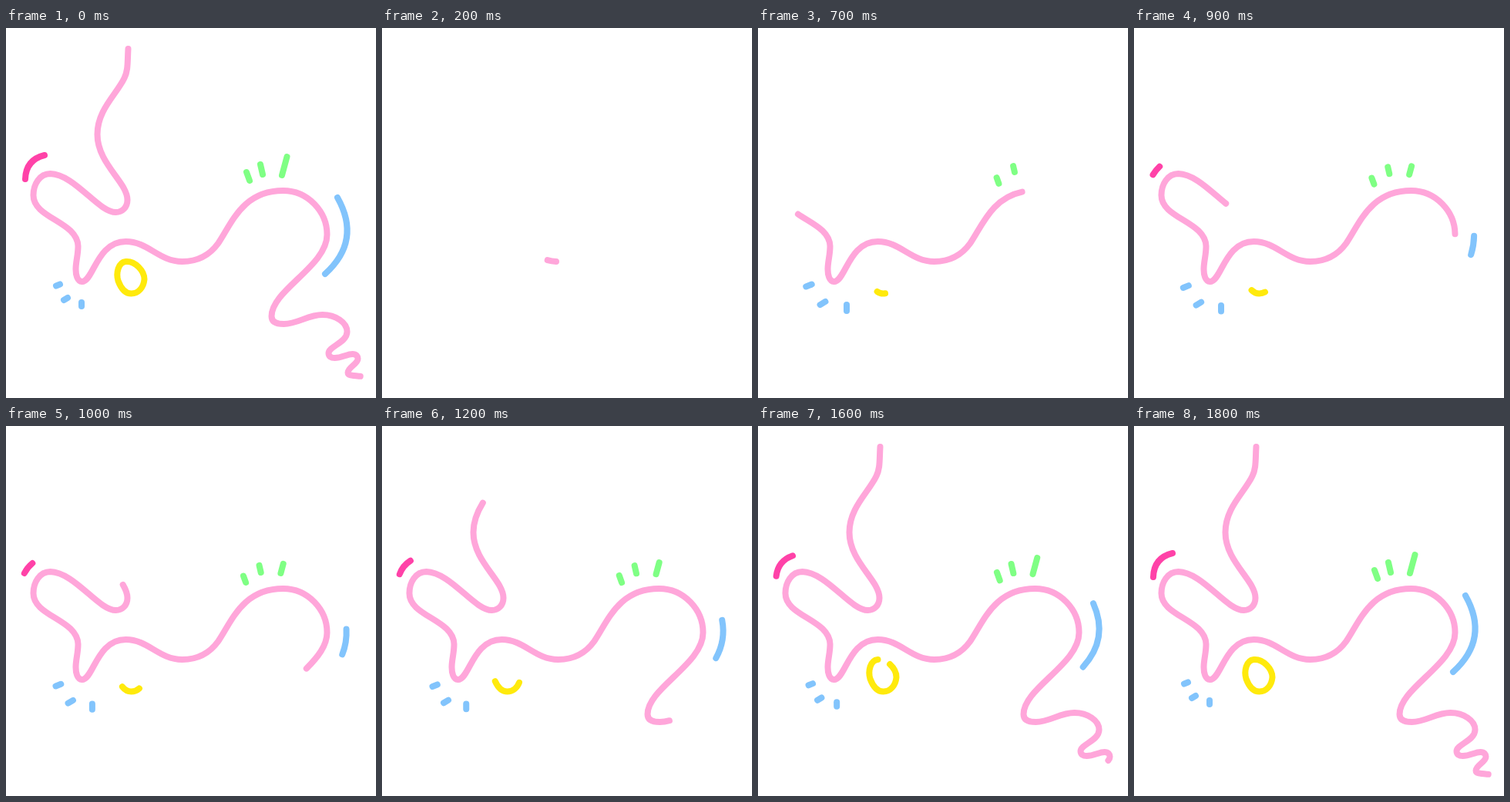
An HTML page that plays this animation: 480x480 px, repeating every 1.9 s.

```html
<!DOCTYPE html>
<html lang="en">
<head>
<meta charset="utf-8">
<title>Ribbon doodle</title>
<style>
  html, body { margin: 0; height: 100%; overflow: hidden; background: #fff; }
  svg { display: block; width: 100%; height: 100%; }
  path { fill: none; stroke-width: 8; stroke-linecap: round; stroke-linejoin: round; }
</style>
</head>
<body>
<svg viewBox="0 0 480 480">
  <g transform="translate(-0.5)">
    <path id="ribbon" stroke="#ffa6da" pathLength="100" d="M159,27 C158,45 159,55 154,65
      C144,86 119,106 119,138 C119,176 158,200 158,223 C158,233 151,239 143,239
      C120,239 90,190 58,189 C44,189 36,203 36,217 C36,247 93,251 94,283
      C94,295 91,303 91,313 C91,320 93,329 99,329 C114,329 118,277 156,277
      C185,277 199,303 229,303 C251,303 266,293 276,279 C294,252 308,211 360,211
      C392,211 417,238 417,268 C417,309 345,340 345,374 C345,382 352,384 361,384
      C379,384 392,372 411,372 C428,372 443,382 443,394 C443,408 419,413 419,422
      C419,426 422,428 427,428 C436,428 443,423 450,423 C455,423 457,426 457,429
      C457,436 444,440 444,447 C444,451 450,451 462,452"/>
    <path id="ring" stroke="#ffea0c" pathLength="100" d="M156,303 C146,304 143,318 146,328
      C149,336 154,344.5 163,344.5 C172,344.5 179,337 180,326 C180,315 168,302 156,303 Z"/>
  </g>
  <g id="accents"></g>
</svg>
<script>
const STEP = 100, STEPS = 19, LAST = STEP * (STEPS - 1);
const BLUE = '#82c4fc', GREEN = '#7fff84', HOT = '#ff42a8';
const byId = id => document.getElementById(id);

const progress = (t, from, to) => Math.min(1, Math.max(0, (t - from) / (to - from)));
const lerp = (a, b, p) => a + (b - a) * p;
const smooth = p => p * p * (3 - 2 * p);

// Each stroke: the centre it starts from, then the line it ends as.
const groups = [
  { color: BLUE, start: 450, stagger: 100, sway: [2, 3], strokes: [
    { from: [115, 363], line: [98, 356, 98, 361] },
    { from: [84, 357], line: [75, 353, 80, 350] },
    { from: [66, 334], line: [65, 334.5, 70, 332.5] }] },
  { color: GREEN, start: 600, stagger: 100, sway: [-3, 3], strokes: [
    { from: [311, 198], line: [312, 187, 316, 198] },
    { from: [332, 183], line: [330, 177, 333, 190] },
    { from: [360, 184], line: [364.5, 167, 358, 191] }] },
  { color: HOT, start: 800, sway: [-3, 0], strokes: [
    { from: [29, 186], line: [50, 165, 25, 196], bow: 0.38 }] },
  { color: BLUE, start: 900, sway: [6, -2], strokes: [
    { from: [439, 286], line: [430, 220, 414, 319], bow: -0.4 }] }
];

const accents = groups.flatMap(({ strokes, color, start, stagger = 0, sway }) =>
  strokes.map(({ from, line, bow = 0 }, i) => {
    const path = document.createElementNS('http://www.w3.org/2000/svg', 'path');
    path.setAttribute('stroke', color);
    byId('accents').append(path);
    return { path, from, line, bow, sway, start: start + i * stagger };
  }));

// Glides to its final place with a sideways sway while its length settles.
function accentShape({ from, line: [x1, y1, x2, y2], bow, sway }, t) {
  const p = progress(t, 700, LAST), swing = Math.sin(Math.PI * p);
  const cx = lerp(from[0], (x1 + x2) / 2, p) + sway[0] * swing;
  const cy = lerp(from[1], (y1 + y2) / 2, p) + sway[1] * swing;
  const full = Math.hypot(x2 - x1, y2 - y1), scale = lerp(8, full, p) / full;
  const dx = (x2 - x1) * scale, dy = (y2 - y1) * scale, bend = bow * p;
  return `M${cx - dx / 2},${cy - dy / 2} Q${cx - dy * bend},${cy + dx * bend} ${cx + dx / 2},${cy + dy / 2}`;
}

// Shows the part of a path between two percentages of its length.
function reveal(path, from, to, visible) {
  path.style.display = visible ? '' : 'none';
  path.setAttribute('stroke-dasharray', `${to - from} 9999`);
  path.setAttribute('stroke-dashoffset', -from);
}

function draw(now) {
  const step = Math.floor(now / STEP) % STEPS;
  const t = step ? step * STEP : LAST; // the loop opens on the finished drawing

  reveal(byId('ribbon'),
    lerp(51.6, 0, smooth(progress(t, 100, 1500))),
    lerp(51.6, 100, smooth(progress(t, 150, 1850))), t > 100);
  reveal(byId('ring'),
    lerp(40, 0, progress(t, 400, 1600) ** 3),
    lerp(46, 100, progress(t, 400, LAST) ** 2), t >= 400);

  for (const accent of accents) {
    accent.path.setAttribute('d', t >= accent.start ? accentShape(accent, t) : '');
  }
}

const start = performance.now();
function tick() {
  draw(performance.now() - start);
  requestAnimationFrame(tick);
}
tick();
</script>
</body>
</html>
```
